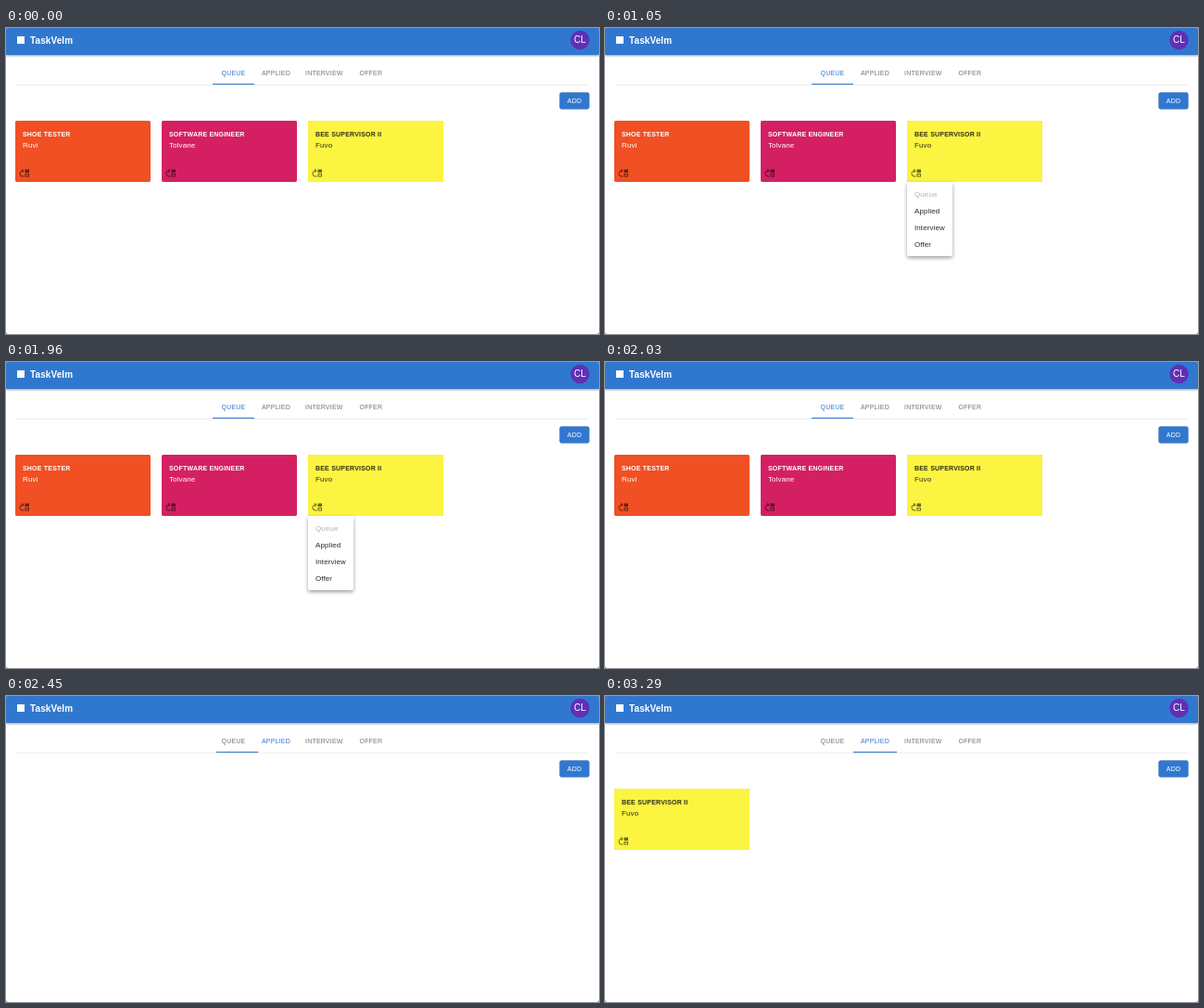
Recreate the animation shown at these times as an HTML page. Size 640x330 px, loop 3.78 s.

```html
<!DOCTYPE html>
<html lang="en">
<head>
<meta charset="utf-8">
<title>Job board</title>
<style>
  html, body { margin: 0; width: 100%; height: 100%; overflow: hidden; background: #fff; }
  svg { display: block; width: 640px; height: 330px; }
  text { font-family: "Liberation Sans", Arial, sans-serif; letter-spacing: .1px; white-space: pre; }

  .brand { font-size: 10px; font-weight: bold; fill: #fff; }
  .caps { font-size: 7px; letter-spacing: .2px; }
  .title { font-size: 7px; font-weight: bold; letter-spacing: .2px; }
  .body { font-size: 8px; }
  .light { fill: #fff; }
  .dark { fill: #2f2e17; }
  .tab { fill: #757575; }
  .bar { filter: drop-shadow(0 1px 1px rgba(0, 0, 0, .4)); }
  .raised { filter: drop-shadow(0 .6px .7px rgba(0, 0, 0, .4)); }
  .paper { filter: drop-shadow(0 2px 2px rgba(0, 0, 0, .38)); }

  /* One loop is 54 ticks of 70 ms; every change lands on a tick. */
  .anim { animation: 3780ms step-end infinite; }
  .queue-tab { animation-name: tab-off; }
  .applied-tab { animation-name: tab-on; }
  .line { animation-name: slide; }
  .menu { animation-name: grow; transform-origin: 326px 166px; }
  .queued { animation-name: leave-page; }
  .moved { animation-name: leave-card; }
  .applied { animation-name: arrive; }

  @keyframes tab-off { 0% { fill: #3078cf; } 64.81%, 100% { fill: #757575; } }
  @keyframes tab-on { 0% { fill: #757575; } 64.81%, 100% { fill: #3078cf; } }
  @keyframes slide {
    0% { transform: translateX(0); width: 45px; }
    64.81% { transform: translateX(4px); width: 45.2px; }
    66.66% { transform: translateX(27px); width: 46.2px; }
    68.51% { transform: translateX(40px); width: 46.8px; }
    70.37% { transform: translateX(44.6px); width: 47px; }
    72.22%, 100% { transform: translateX(45px); width: 47px; }
  }
  @keyframes grow {
    0% { opacity: 0; transform: scale(.75, .5625); }
    14.81% { opacity: .15; transform: scale(.79, .63); }
    16.66% { opacity: .7; transform: scale(.93, .87); }
    18.51% { opacity: .95; transform: scale(.99, .98); }
    20.37% { opacity: 1; transform: none; }
    53.7%, 100% { opacity: 0; transform: none; }
  }
  @keyframes leave-card { 0% { opacity: 1; } 61.11%, 100% { opacity: 0; } }
  @keyframes leave-page { 0% { opacity: 1; } 64.81%, 100% { opacity: 0; } }
  @keyframes arrive { 0% { opacity: 0; } 68.51%, 100% { opacity: 1; } }
</style>
</head>
<body>
<svg viewBox="0 0 640 330">
  <defs>
    <g id="card">
      <rect class="raised" width="146" height="66" rx="2"/>
      <path transform="translate(4 50.5) scale(.5)" fill="#000" fill-opacity=".56" fill-rule="evenodd"
        d="M3 13c0-2.5 1.8-4.5 4.1-4.9L5.6 9.6 7 11l4-4-4-4-1.4 1.4L7.2 6C3.7 6.5 1 9.4 1 13c0 3.9 3.1 7 7 7h3v-2H8c-2.8 0-5-2.2-5-5zM13 13v7h9v-7zM20 18h-5v-3h5zM13 4h9v7h-9z"/>
    </g>
    <g id="bee">
      <use href="#card" fill="#fbf441"/>
      <text class="title dark" x="8" y="17">BEE SUPERVISOR II</text>
      <text class="body dark" x="8" y="29">Fuvo</text>
    </g>
  </defs>

  <rect width="640" height="330" fill="#4a4f57"/>
  <rect width="640" height="330" rx="2" fill="#fff"/>

  <path class="bar" fill="#3078cf" d="M0 29V2Q0 0 2 0H638Q640 0 640 2V29Z"/>
  <rect x="12" y="9" width="8" height="8" fill="#fff"/>
  <text class="brand" x="26" y="16.5">TaskVelm</text>
  <circle cx="619.5" cy="13" r="10.3" fill="#5f30b6"/>
  <text class="light" x="619.5" y="16.3" font-size="10" text-anchor="middle">CL</text>

  <rect x="11" y="61" width="618" height="1" fill="#eee"/>
  <text class="caps anim queue-tab" x="232.5" y="51">QUEUE</text>
  <text class="caps anim applied-tab" x="276" y="51">APPLIED</text>
  <text class="caps tab" x="323" y="51">INTERVIEW</text>
  <text class="caps tab" x="381.5" y="51">OFFER</text>
  <rect class="anim line" x="223" y="60" width="45" height="1" fill="#3078cf"/>

  <rect class="raised" x="597.5" y="69.5" width="32" height="18" rx="2" fill="#3078cf"/>
  <text class="caps light" x="605.8" y="81">ADD</text>

  <g class="anim queued">
    <g transform="translate(10 100)">
      <use href="#card" fill="#f05024"/>
      <text class="title light" x="8" y="17">SHOE TESTER</text>
      <text class="body light" x="8" y="29">Ruvi</text>
    </g>
    <g transform="translate(168 100)">
      <use href="#card" fill="#d42062"/>
      <text class="title light" x="8" y="17">SOFTWARE ENGINEER</text>
      <text class="body light" x="8" y="29">Tolvane</text>
    </g>
  </g>
  <g class="anim moved"><use href="#bee" x="326" y="100"/></g>
  <g class="anim applied"><use href="#bee" x="10" y="100"/></g>

  <g class="anim menu">
    <rect class="paper" x="326" y="166" width="49" height="80" rx="2" fill="#fff"/>
    <g class="body" fill="#2b2b2b">
      <text x="334" y="182.3" fill="#b4b4b4">Queue</text>
      <text x="334" y="200.3">Applied</text>
      <text x="334" y="218.3">Interview</text>
      <text x="334" y="236.3">Offer</text>
    </g>
  </g>
</svg>
</body>
</html>
```
